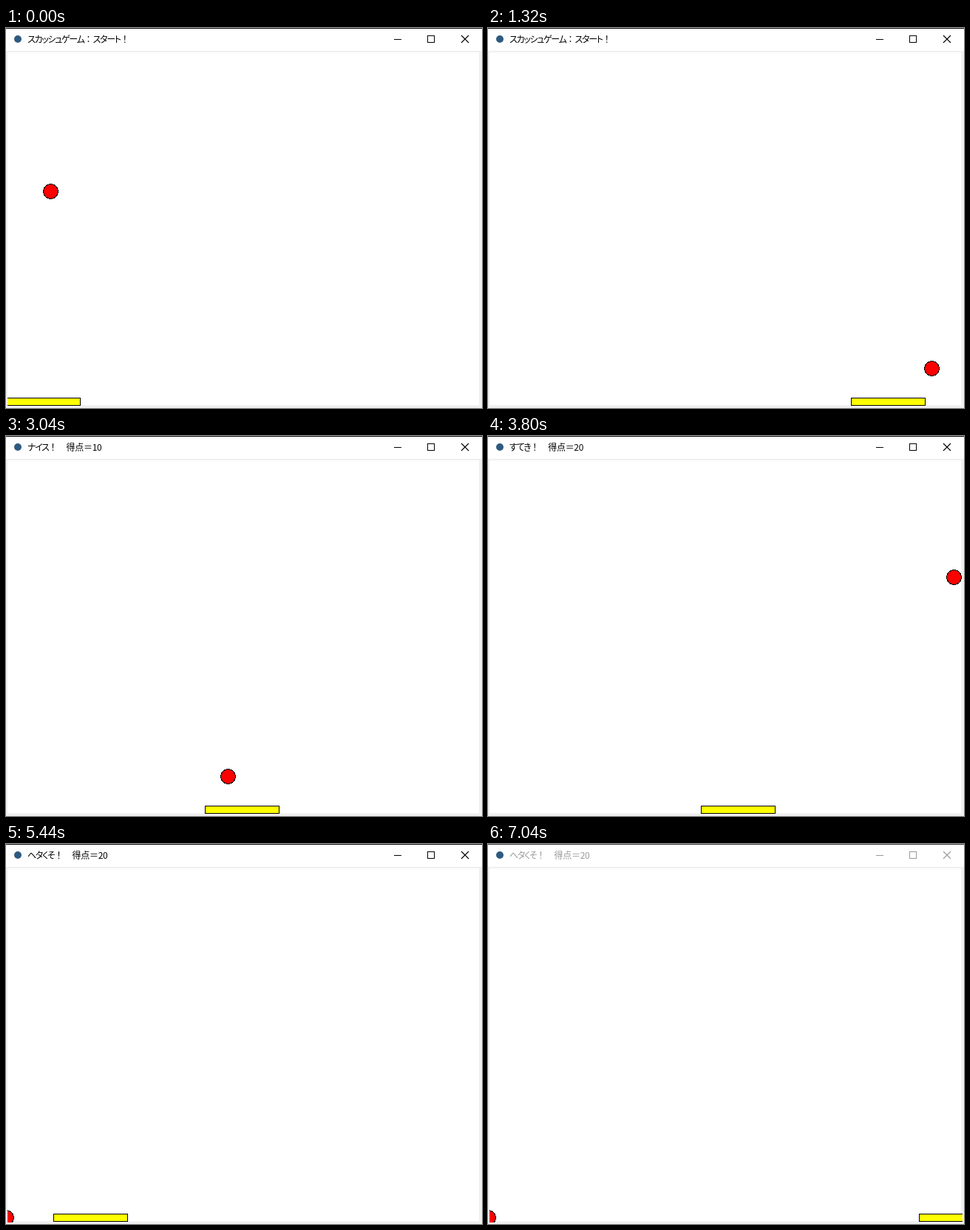
An HTML page for the animation above (7.2 s loop, 644 by 515 pixels).

```html
<!DOCTYPE html>
<html lang="ja">
<head>
<meta charset="utf-8">
<title>スカッシュゲーム</title>
<style>
  html, body { margin: 0; width: 100%; height: 100%; overflow: hidden; background: #f0f0f0; }
  svg { display: block; width: 644px; height: 515px; shape-rendering: crispEdges; }
  text { font: 12px "Noto Sans CJK JP", "Noto Sans CJK", "Noto Sans", sans-serif; }
  #message { font-feature-settings: "palt"; letter-spacing: -1.3px; }
  #message .wide { font-feature-settings: normal; letter-spacing: 0; }
  #score { letter-spacing: -0.3px; }
  #bar { --ink: #000; --edge: #111; }
  #bar.idle { --ink: #999; --edge: #3c3c3c; }
  #bar text { fill: var(--ink); }
  #bar path { fill: none; stroke: var(--ink); }
  #edge { fill: var(--edge); }
  .smooth { shape-rendering: auto; }
</style>
</head>
<body>
<svg viewBox="0 0 644 515">
  <defs><clipPath id="inside"><rect x="2" y="33" width="640" height="480"/></clipPath></defs>
  <rect width="644" height="515" fill="#f0f0f0"/>
  <g id="bar">
    <rect width="644" height="31" fill="#fff"/>
    <rect id="edge" width="644" height="1"/>
    <circle class="smooth" cx="16" cy="15" r="5" fill="#2f5a80"/>
    <text id="message" x="29" y="20"></text>
    <text id="score" y="20"></text>
    <path d="M525 15.5h10M570.5 10.5h9v9h-9z"/>
    <path class="smooth" d="M616 10l10 10M626 10l-10 10" stroke-width="1.1"/>
  </g>
  <g clip-path="url(#inside)">
    <rect y="31" width="640" height="480" fill="#fff"/>
    <circle id="ball" r="10" fill="#f00" stroke="#000"/>
    <rect id="racket" y="501.5" width="100" height="10" fill="#ff0" stroke="#000"/>
  </g>
</svg>
<script>
const LOOP = 7200, REFRESH = 40, IDLE = 7040;
const STEP = 25, STALL = 100, SPEED = 15;
const LEFT = 0, RIGHT = 630, TOP = 10, BOTTOM = 460, RACKET = 100;

// Turning points of the player's hand: time, racket position
const hand = [
  [0, 0], [600, 385], [800, 423], [1040, 500], [1400, 488], [2000, 244],
  [2600, 200], [3000, 231], [3040, 269], [3400, 340], [4400, 209],
  [5040, 58], [5440, 64], [6120, 240], [6720, 583]
];
const praise = ["ナイス！", "すてき！"];

const el = id => document.getElementById(id);
const [bar, message, score, ball, racket] =
  ["bar", "message", "score", "ball", "racket"].map(el);

function racketAt(t) {
  const i = hand.findIndex(p => p[0] > t);
  if (i < 0) return hand[hand.length - 1][1];
  const [t0, a] = hand[i - 1], [t1, b] = hand[i];
  return a + (b - a) * (t - t0) / (t1 - t0);
}

// Plays the whole game; each bounce sound holds up the steps before it
function play() {
  let t = 40, x = 60, y = 190, dx = SPEED, dy = -SPEED, hits = 0;
  let words = "スカッシュゲーム：スタート！", points = "", missed = false;
  const log = [];
  const save = time => log.push({ time, x, y, words, points });
  save(0);
  while (true) {
    const nextX = x + 2 * dx, nextY = y + 2 * dy;
    const bounce = nextX === LEFT || nextX === RIGHT || nextY === TOP || nextY === BOTTOM;
    t += STEP + (bounce && !missed ? STALL : 0);
    x += dx;
    if (!missed) y += dy;
    if (x === LEFT || x === RIGHT) dx = -dx;
    if (y === TOP) dy = -dy;
    if (y === BOTTOM) {
      const gap = x - racketAt(t);
      if (gap >= 0 && gap <= RACKET) {
        dy = -dy;
        words = praise[hits++];
        points = `得点＝${hits * 10}`;
      }
    }
    if (y > BOTTOM) {
      if (missed) words = "ヘタくそ！";
      missed = true;
    }
    save(t);
    if (missed && x === LEFT) return log;
  }
}

const log = play();

function setTitle({ words, points }) {
  if (message.textContent === words) return;
  message.innerHTML = words.replace(/[：！]/g, '<tspan class="wide">$&</tspan>');
  score.textContent = points;
  score.setAttribute("x", 41 + message.getComputedTextLength());
}

function draw(t) {
  const now = log.filter(s => s.time <= t).pop();
  ball.setAttribute("cx", now.x + 0.5);
  ball.setAttribute("cy", now.y + 31.5);
  racket.setAttribute("x", Math.round(racketAt(t)) + 0.5);
  setTitle(now);
  bar.classList.toggle("idle", t >= IDLE);
}

const start = performance.now();
function frame(now) {
  const t = Math.max(0, now - start) % LOOP;
  draw(Math.floor(t / REFRESH) * REFRESH);
  requestAnimationFrame(frame);
}
frame(start);
</script>
</body>
</html>
```
